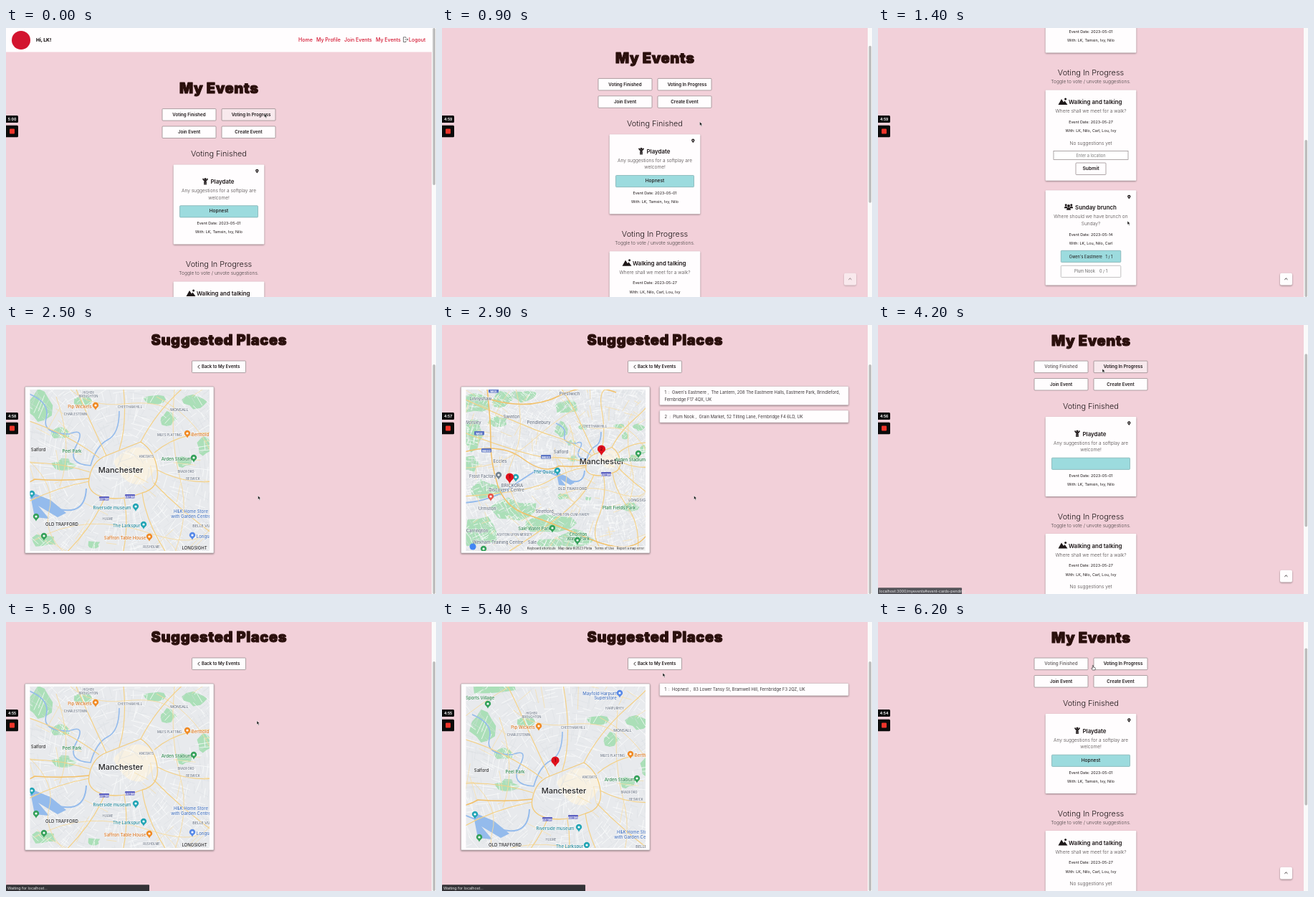
Write an HTML page that moves like this. It is 600 px wide and 375 px high and loops after 6.3 s.

```html
<!DOCTYPE html>
<html lang="en">
<head>
<meta charset="utf-8">
<title>My Events</title>
<style>
  html, body { margin: 0; height: 100%; overflow: hidden; background: #f2d0d9; }
  svg { display: block; width: 100vw; height: 100vh; }
  text { font-family: Inter, "Open Sans", sans-serif; white-space: pre; }
  .title { letter-spacing: .03em; stroke: #2a0f0c; stroke-width: 1px; stroke-linejoin: round; }
  .card { filter: drop-shadow(0 1px 1px #0006); }
  .road { fill: none; vector-effect: non-scaling-stroke; stroke-linejoin: round; }
  .label { paint-order: stroke; stroke: #fffc; stroke-width: 1px; }
</style>
</head>
<body>
<svg id="stage" viewBox="0 0 600 375"></svg>
<script>
const LOOP = 6300;
const INK = '#1d1718', RED = '#d3142f', AQUA = '#9cdbde';

// Drawing helpers
const text = (s, x, y, size, { fill = INK, weight = 400, anchor = 'middle', more = '' } = {}) =>
  `<text x="${x}" y="${y}" font-size="${size}" fill="${fill}" font-weight="${weight}" text-anchor="${anchor}" ${more}>${s}</text>`;
const rect = (x, y, w, h, fill, more = '') =>
  `<rect x="${x}" y="${y}" width="${w}" height="${h}" fill="${fill}" ${more}/>`;
const circle = (x, y, r, fill) => `<circle cx="${x}" cy="${y}" r="${r}" fill="${fill}"/>`;
const path = (d, fill, more = '') => `<path d="${d}" fill="${fill}" ${more}/>`;
const group = (id, body, more = '') => `<g id="${id}" ${more}>${body}</g>`;
const at = (x, y, body) => `<g transform="translate(${x} ${y})">${body}</g>`;
const title = (s, y) => text(s, 297.3, y, 20, { fill: '#2a0f0c', weight: 900, more: 'class="title"' });
const card = (x, y, w, h, more = '') => rect(x, y, w, h, '#fffdfe', `class="card" rx="1" ${more}`);
const button = (label, x, y, w, { id = '', dx = 0, size = 6.2 } = {}) =>
  group(id, rect(x, y, w, 16.5, '#fffdfe', 'rx="1" stroke="#8d8083" stroke-width=".7"') +
    text(label, x + w / 2 + dx, y + 10.2, size, { weight: 600 }));

const marker = (x, y, s, fill, hole = '#fff') => at(x, y,
  path(`M0 ${s * 1.6}C${-s * .3} ${s * .8} ${-s} ${s * .6} ${-s} 0A${s} ${s} 0 0 1 ${s} 0C${s} ${s * .6} ${s * .3} ${s * .8} 0 ${s * 1.6}Z`, fill) +
  circle(0, 0, s * .38, hole));
const numberPin = (x, y, n) => marker(x, y, 5.6, '#e0101c', '#e0101c') +
  text(n, x, y + 2, 5.5, { fill: '#6b0710', weight: 600 });

// Events page
const body = (s, y) => text(s, 297, y, 6.6, { fill: '#4b4546', weight: 300 });
const details = (date, people, y) =>
  text('Event Date: ' + date, 297, y, 5.4) + text('With: ' + people, 297, y + 12.3, 5.4);
const heading = (s, y) => text(s, 297, y, 10.9, { weight: 300 });
const name = (s, x, y) => text(s, x, y, 7.9, { weight: 600, anchor: 'start' });

const child = circle(0, -3.6, 1.5, INK) +
  path('M-3.4-4L-1.5-1.4H1.5L3.4-4M0-1V1M-1 0V4.6M1 0V4.6', 'none', `stroke="${INK}" stroke-width="1.6"`);
const mountains = path('M-6.5 4.5L-2-3.5L1 1L2.5-1L6.5 4.5Z', INK) + circle(3.6, -3.6, 1.5, INK);
const crowd = [[-3.8, -2.4, 1.5], [3.8, -2.4, 1.5], [0, -1.2, 1.9]].map(([x, y, r]) =>
  circle(x, y, r, INK) + path(`M${x - r * 1.5} ${y + r * 3}q0-${r * 1.8} ${r * 1.5}-${r * 1.8}t${r * 1.5} ${r * 1.8}z`, INK)).join('');

const eventsPage = rect(0, 0, 594, 33.5, '#fffdfe') + circle(21, 17, 13, RED) +
  text('Hi, LK!', 42, 19, 6.6, { weight: 800, anchor: 'start' }) +
  [['Home', 408], ['My Profile', 433], ['Join Events', 472], ['My Events', 516], ['Logout', 562]]
    .map(([s, x]) => text(s, x, 19, 7, { fill: RED, weight: 500, anchor: 'start' })).join('') +
  path('M558 14V12.8H554.5V19.5H558V18M556.5 16H561M559.6 14.6L561 16L559.6 17.4', 'none', 'stroke="#444" stroke-width=".7"') +
  title('My Events', 91) +
  button('Voting Finished', 218, 112.6, 75, { id: 'finished' }) +
  button('Voting In Progress', 301, 112.6, 75, { id: 'progress', dx: 3.5 }) +
  button('Join Event', 218, 137, 75) + button('Create Event', 301, 137, 75) +
  heading('Voting Finished', 179) +
  card(233.7, 190.5, 126.6, 111) + marker(350.3, 199, 2.2, INK) + at(278, 214, child) +
  name('Playdate', 285.5, 217) + body('Any suggestions for a softplay are', 229) + body('welcome!', 238.6) +
  rect(242.5, 247.7, 109, 16.2, AQUA, 'rx="1" stroke="#79a9ac" stroke-width=".7"') +
  group('winner', text('Hopnest', 297, 257.2, 6.6, { weight: 500 })) +
  details('2023-05-01', 'LK, Tamsin, Ivy, Nilo', 274) +
  heading('Voting In Progress', 333) + body('Toggle to vote / unvote suggestions.', 344.2) +
  at(0, 267,
    card(233.7, 86.5, 126.6, 126.3) + at(258, 102.5, mountains) + name('Walking and talking', 266, 106) +
    body('Where shall we meet for a walk?', 118) + details('2023-05-27', 'LK, Nilo, Carl, Lou, Ivy', 132.7) +
    body('No suggestions yet', 162.6) +
    rect(245, 171.5, 104, 12, '#fff', 'stroke="#8b8385" stroke-width=".7"') +
    text('Enter a location', 297, 179.6, 5.6, { fill: '#777' }) + button('Submit', 276, 188, 42, { size: 6.8 }) +
    card(233.7, 226.2, 126.6, 132.3) + marker(350.3, 235, 2.2, INK) + at(266, 249.2, crowd) +
    name('Sunday brunch', 275, 253) + body('Where should we have brunch on', 265) + body('Sunday?', 274.6) +
    details('2023-05-14', 'LK, Lou, Nilo, Carl', 289.5) +
    rect(255.3, 310.3, 83.5, 16.2, AQUA, 'rx="1" stroke="#79a9ac" stroke-width=".7"') +
    text("Gwen's Eastmere   1 / 1", 297, 320.6, 5.6) +
    rect(255.3, 331.3, 83.5, 16.2, '#fffdfe', 'rx="1" stroke="#aaa" stroke-width=".7"') +
    text('Plum Nook    0 / 1', 297, 341.3, 5.6, { fill: '#666' }));

// Map
let seed = 11;
const random = () => (seed = seed * 16807 % 2147483647) / 2147483647;

const parks = [
  [-190, 40, 50, 32], [-120, 30, 32, 24], [-60, 20, 40, 18], [-200, 130, 32, 42], [-130, 90, 28, 16],
  [-210, 210, 28, 24], [-170, 280, 52, 26], [-90, 340, 70, 34], [10, 375, 70, 28], [-180, 400, 50, 45],
  [90, 420, 55, 28], [20, 435, 45, 18], [240, 330, 26, 15], [47, 112, 19, 25], [76, 150, 13, 10],
  [80, 195, 17, 9], [108, 106, 12, 10], [207, 104, 14, 8], [226, 131, 12, 10], [264, 107, 18, 10],
  [248, 190, 11, 9], [276, 168, 9, 13], [54, 300, 17, 10], [122, 306, 10, 6], [60, 50, 35, 20]
].map(([x, y, w, h]) => {
  let d = '';
  for (let i = 0; i < 11; i++) {
    const a = i / 11 * 2 * Math.PI, k = .65 + .5 * random();
    d += `${i ? 'L' : 'M'}${(x + w * k * Math.cos(a)).toFixed(1)} ${(y + h * k * Math.sin(a)).toFixed(1)}`;
  }
  return d + 'Z';
}).join('');

// Short streets, roughly along and across the way to the centre
function streets(count, shortest) {
  let d = '';
  for (let i = 0; i < count; i++) {
    const x = -230 + 530 * random(), y = 470 * random();
    const turn = Math.atan2(y - 198, x - 160) + (random() < .5 ? 0 : Math.PI / 2) + .5 * (random() - .5);
    const length = shortest * (1 + 2 * random());
    d += `M${x.toFixed(1)} ${y.toFixed(1)}l${(length * Math.cos(turn)).toFixed(1)} ${(length * Math.sin(turn)).toFixed(1)}`;
  }
  return d;
}

const ring = 'M116 214Q120 190 140 182T188 163Q208 176 211 202T190 234Q160 246 136 240T116 214';
const radials = 'M140 182Q120 140 98 90T40-10M158 174Q172 130 160 60T190 0M188 163Q210 120 250 85T290 40' +
  'M207 178Q240 150 290 150M211 202Q250 222 290 218M206 220Q245 260 290 292M190 234Q196 280 232 330T260 460' +
  'M165 242Q175 300 150 360T170 460M138 240Q118 290 60 340T-110 460M116 218Q60 228 10 258T-230 300' +
  'M117 205Q70 190 20 192T-230 120M130 185Q80 148 20 130T-220 30';
const links = 'M33 190Q70 225 60 260T96 330M90 90Q118 115 165 110T230 120M235 90Q228 160 243 215T230 330' +
  'M40 300Q110 260 200 290T290 260M70 100Q95 170 75 225M210 100Q260 125 285 175M-80 0Q-50 120-90 200T-20 400M-220 220Q-120 220-40 150T80 60';
const motorway = 'M-160 0Q-150 90-150 150T-130 270T-50 350T130 420T290 400M-220 175Q-120 150-60 195T40 215Q80 218 116 214M-150 30Q-40 60 40 20T200 10';
const river = 'M32 96Q62 108 56 130T88 152Q112 142 98 168T118 196Q126 168 142 160T158 120';
const canal = 'M-225 318Q-150 312-100 278T-30 232T50 248T112 228';

const line = (d, color, width) => path(d, 'none', `class="road" stroke="${color}" stroke-width="${width}"`);
const terrain = rect(-240, -20, 550, 500, '#e8eaed') +
  path('M150 190Q176 160 200 176T190 222Q164 226 150 190Z', '#f8f1e2') + path(parks, '#abdfb8') +
  line(streets(1700, 8), '#d9dce0', .5) + line(streets(1700, 8), '#fafbfc', .8) +
  line(river, '#94bbec', 1.6) + line(canal, '#94bbec', 2) +
  path('M33 232L62 244L84 262L72 268L45 252L60 270L40 268Z', '#94bbec') +
  line(streets(130, 14), '#f6e0ae', .8) + line(links, '#f6dba0', .9) + line(radials, '#f4d187', 1.2) +
  line(ring, '#f3cb7b', 1.3) + line(motorway, '#f2c069', 1.5);

const tones = { grey: '#667080', dark: '#202124', orange: '#d8731f', teal: '#21879a', green: '#278349', blue: '#4471bd' };
const labels = list => list.map(([s, x, y, size = 4.2, tone = 'grey']) =>
  text(s, x, y, size, { fill: tones[tone], weight: 500, more: 'class="label"' })).join('');
const pins = list => list.map(([x, y, fill]) => marker(x, y, 4.2, fill)).join('');
const shield = (s, x, y, fill) => rect(x - 7, y - 3, 14, 5.6, fill, 'rx="1"') + text(s, x, y + 1.5, 4, { fill: '#fff', weight: 700 });
const ORANGE = '#f08a24', TEAL = '#22a5b5', GREEN = '#35a15b', BLUE = '#5789e8';

const nearMap = terrain + shield('A57(M)', 137, 242, '#5b5fc0') + shield('A57(M)', 173, 239, '#5b5fc0') + labels([
  ['HIGHER', 115, 96], ['BROUGHTON', 115, 101], ['CHEETHAM HILL', 173, 116], ['CHARLESTOWN', 97, 126],
  ['MONSALL', 242, 120, 5.2], ['MILES PLATTING', 228, 155], ['ANCOATS', 196, 185], ['BRADFORD', 251, 206],
  ['BESWICK', 261, 216], ['HULME', 142, 272], ['BELLE VUE', 274, 282, 5.2], ['OLD TRAFFORD', 78, 280, 6, 'dark'],
  ['LONGSIGHT', 263, 312.5, 6, 'dark'], ['RUSHOLME', 203, 310.5], ['HARPURHEY', 231, 89], ['Salford', 45, 176, 6, 'dark'],
  ['Manchester', 160, 205.5, 11, 'dark'], ['Peel Park', 92, 178, 6, 'green'], ['Pip Wickets', 103, 115.5, 6, 'orange'],
  ['Berthold', 271, 155, 6, 'orange'], ['Arden Stadium', 238, 189, 6, 'green'], ['Riverside museum', 148, 257, 6, 'teal'],
  ['The Larkspur', 168, 282, 6, 'teal'], ['Saffron Table House', 166, 299, 6, 'orange'],
  ['H&amp;K Home Store', 258, 262, 6, 'blue'], ['with Garden Centre', 258, 268.5, 6, 'blue'], ['Longsight', 280, 297, 6, 'blue'],
  ['Sports Village', 43, 75, 6, 'green'], ['Mayfold Harpurhey', 214, 69, 6, 'blue'], ['Superstore', 218, 75, 6, 'blue']
]) + pins([[125, 112, ORANGE], [253, 151, ORANGE], [262, 185, GREEN], [181, 253, TEAL], [192, 278, TEAL], [200, 295, ORANGE],
  [260, 293, BLUE], [42, 267, GREEN], [53, 294, GREEN], [36, 235, TEAL], [54, 81, GREEN], [238, 66, BLUE]]);

const farMap = `<g transform="translate(143 89) scale(.5)">${terrain}</g>` +
  [['M60', 72, 92], ['M60', 52, 151], ['M602', 62, 175], ['M602', 145, 184]].map(s => shield(...s, '#5b74c4')).join('') +
  shield('A57(M)', 229, 208, '#5b5fc0') + labels([
    ['Linnyshaw', 54, 105, 6], ['Swinton', 97, 130, 6], ['Prestwich', 178, 98, 6], ['CHEETHAM HILL', 213, 143], ['Worsley', 43, 138, 6],
    ['Pendlebury', 135, 138, 6], ['Eccles', 81, 192, 6], ['Salford', 166, 179, 6], ['Manchester', 223, 194, 11, 'dark'],
    ['Frost Factory', 57, 213, 6], ['BRICKORA', 98, 226, 6], ['Discovery Centre', 90, 232, 6], ['The Quays', 143, 207, 6, 'teal'],
    ['OLD TRAFFORD', 182, 230, 5.4], ['LONGSIGHT', 276, 246, 5.4], ['Urmston', 63, 258, 6], ['Stretford', 143, 262, 6],
    ['CHORLTON-CUM-HARDY', 180, 266], ['Platt Fields Park', 247, 257, 6, 'green'], ['Carrington', 49, 289, 6],
    ['ASHTON UPON MERSEY', 101, 294], ['Sale Water Park', 129, 286, 6, 'green'], ['Chorlton', 190, 294, 6, 'green'],
    ['Water Park', 190, 300, 6, 'green'], ['Sale', 126, 305, 6], ['Wexham Training Centre', 78, 305, 6],
    ['Arden Stadium', 263, 190, 6, 'green']
  ]) + pins([[79, 209, '#71808d'], [103, 212, TEAL], [161, 203, TEAL], [68, 239, '#e8574c'], [154, 283, GREEN],
    [189, 300, GREEN], [274, 179, GREEN], [58, 312, GREEN]]) +
  rect(115, 308.5, 169, 6.5, '#f4f4f4cc') + circle(43, 309, 4.5, '#4285f4') +
  text('Keyboard shortcuts   Map data ©2023 Plotia   Terms of Use   Report a map error', 282, 313.4, 4.3, { anchor: 'end', fill: '#333' }) +
  numberPin(222.5, 173, 2) + numberPin(94.5, 212, 1);

// Suggested places page
const row = (y, h, ...lines) => card(303.7, y, 263.5, h, 'stroke="#c9b7bc" stroke-width=".5"') +
  lines.map((s, i) => text(s, 310.5, y + 10.6 + i * 9.7, 5.8, { anchor: 'start', fill: '#3b3537' })).join('');
const placesPage = title('Suggested Places', 28) +
  button('Back to My Events', 259.5, 50, 75, { dx: 2.6, size: 6 }) +
  path('M270.2 55.8L267.8 58.3L270.2 60.8', 'none', `stroke="${INK}" stroke-width=".9"`) +
  card(26.5, 86, 263.5, 232, 'stroke="#aaa0a3" stroke-width=".6"') +
  `<g clip-path="url(#mapFrame)">${group('near', nearMap)}${group('far', farMap)}${group('onePin', numberPin(158, 193, 1))}</g>` +
  group('twoRows',
    row(85.5, 26, "1  :  Gwen's Eastmere ,  The Lantern, 208 The Eastmere Halls, Eastmere Park, Brindleford,", 'Fernbridge F17 4QX, UK') +
    row(119, 17, '2  :  Plum Nook ,  Grain Market, 52 Tilting Lane, Fernbridge F4 6LD, UK')) +
  group('oneRow', row(85.5, 17.2, '1  :  Hopnest ,  83 Lower Tansy St, Bramwell Hill, Fernbridge F3 2QZ, UK'));

// Overlays
const toTop = rect(561, 341.7, 17, 16.8, '#fffdfe', 'class="card" rx="2"') +
  path('M567.4 350.8L569.4 348.9L571.4 350.8', 'none', `stroke="${INK}" stroke-width=".9"`);
const status = (id, s, w, fill) => group(id, rect(0, 366.3, w, 9, fill, 'rx="1"') +
  text(s, 2, 372.6, 5.3, { fill: '#e8e8e8', anchor: 'start' }));
const recorder = rect(-3, 122, 20, 10, '#0b0b0b', 'rx="1.5"') +
  text('', 8.6, 129, 5, { fill: '#fff', weight: 700, more: 'id="clock"' }) +
  rect(-3, 135.8, 20, 16.4, '#0b0b0b', 'rx="1.5"') + rect(5, 140.5, 7, 7, '#f0352b', 'rx="1"');
const arrow = path('M0 0V5.2L1.3 4.1L2.2 6.2L3.2 5.8L2.3 3.8H4Z', '#111', 'stroke="#fff" stroke-width=".5"');
const hand = path('M-.6-.5Q0-1.2.6-.5V2L3 2.6Q3.7 3 3.4 4L2.8 6H-.6L-2.2 3.6Q-2 2.7-.6 3.6Z', '#fff', 'stroke="#222" stroke-width=".6"');

stage.innerHTML = `<clipPath id="mapFrame"><rect x="33.5" y="90" width="250.5" height="225"/></clipPath>` +
  rect(0, 0, 600, 375, '#f2d0d9') + group('events', eventsPage) + group('places', placesPage) + group('toTop', toTop) +
  rect(594, 0, 6, 375, '#fafafa') + rect(595.5, 0, 3.6, 0, '#bdbdbd', 'id="thumb" rx="1.8"') +
  status('linkStatus', 'localhost:3000/myevents#event-cards-pending', 117, '#55545a') +
  status('waitStatus', 'Waiting for localhost...', 200, '#343337') + recorder +
  group('cursor', group('arrow', arrow) + group('hand', hand));

// Motion
const $ = id => document.getElementById(id);
const show = (id, on) => $(id).setAttribute('display', on ? 'inline' : 'none');
const move = (id, x, y) => $(id).setAttribute('transform', `translate(${x} ${y})`);
const within = (t, ...spans) => spans.some(([from, to]) => t >= from && t < to);
const ease = p => p * p * (3 - 2 * p);
const clamp = p => Math.min(1, Math.max(0, p));

const cursorPath = [[0, 360.5, 119.5], [800, 360.5, 119.5], [1400, 348, 269], [1800, 350, 236], [2400, 350, 236],
  [2500, 351.5, 238], [3200, 351.5, 238], [3400, 318, 67], [3700, 292, 59], [4000, 292, 59], [4200, 313, 61],
  [4350, 315, 63], [4700, 350, 137], [5150, 350, 138], [5400, 308, 71], [5700, 299, 61], [6300, 300, 61]];
function cursorAt(t) {
  const i = cursorPath.findIndex(k => k[0] > t);
  const [t0, x0, y0] = cursorPath[i - 1], [t1, x1, y1] = cursorPath[i];
  const p = ease((t - t0) / (t1 - t0));
  return [x0 + (x1 - x0) * p, y0 + (y1 - y0) * p];
}

function draw(t) {
  const onEvents = within(t, [0, 2500], [4000, 5000], [6000, LOOP]);
  const loaded = within(t, [0, 2500], [4300, 5000], [6100, LOOP]);
  const scroll = t < 2500 ? 267 * ease(clamp((t - 750) / 600)) : 62.5;
  const farView = within(t, [2800, 4000]), panned = within(t, [5300, 6000]);

  show('events', onEvents);
  show('places', !onEvents);
  move('events', 0, -scroll);
  show('winner', loaded);
  $('finished').lastChild.setAttribute('opacity', within(t, [4000, 4500], [6000, LOOP]) ? .65 : 1);
  $('progress').firstChild.setAttribute('fill', within(t, [0, 800], [4100, 4400]) ? '#f8e9ed' : '#fffdfe');
  show('toTop', onEvents);
  $('toTop').setAttribute('opacity', clamp((scroll - 20) / 40));

  show('near', !farView);
  show('far', farView);
  show('twoRows', farView);
  show('oneRow', panned);
  show('onePin', panned);
  move('near', panned ? 10 : 0, panned ? 33 : 0);

  const pageHeight = loaded ? 642 : 583;
  $('thumb').setAttribute('y', onEvents ? scroll / pageHeight * 375 : 55);
  $('thumb').setAttribute('height', onEvents ? 375 * 375 / pageHeight : 320);

  show('linkStatus', within(t, [100, 850], [4150, 4450]));
  show('waitStatus', within(t, [4900, 5550]));
  const left = 300 - Math.floor((t + 400) / 1000);
  $('clock').textContent = `${Math.floor(left / 60)}:${String(left % 60).padStart(2, '0')}`;

  const pointing = within(t, [200, 800], [1800, 2450], [3550, 4000], [4700, 5000], [5600, LOOP]);
  show('hand', pointing);
  show('arrow', !pointing);
  move('cursor', ...cursorAt(t));
}

const start = performance.now();
function tick() {
  draw((performance.now() - start) % LOOP);
  requestAnimationFrame(tick);
}
tick();
</script>
</body>
</html>
```
